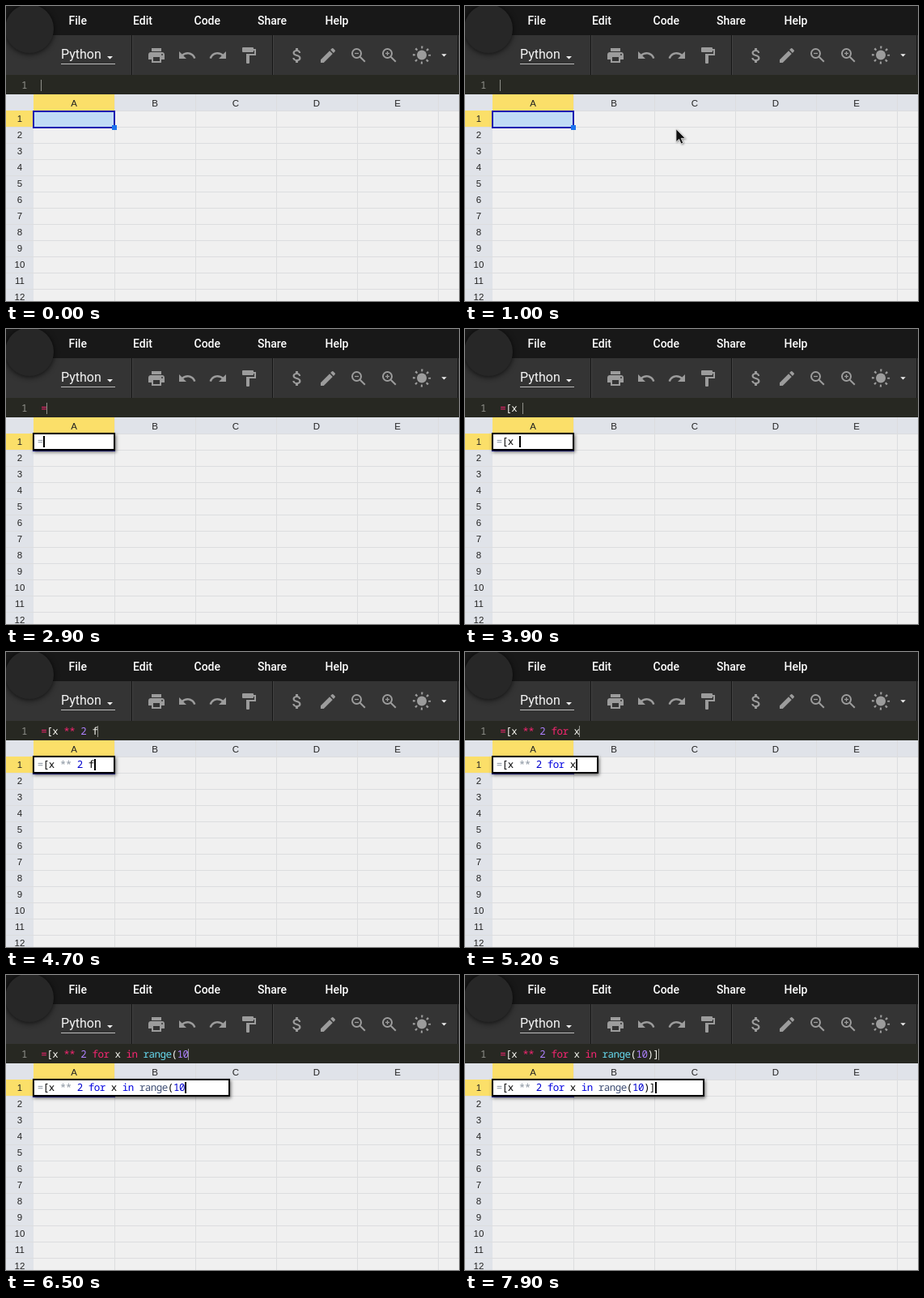
An HTML page that plays this animation: 560x364 px, repeating every 8000 ms.

```html
<!DOCTYPE html>
<html lang="en">
<head>
<meta charset="utf-8">
<title>Spreadsheet formula</title>
<style>
html, body { margin: 0; width: 100%; height: 100%; overflow: hidden; }
body { position: relative; background: #f0f0f0; }
div, svg, .caret { position: absolute; }

.menu { left: 0; top: 0; width: 560px; height: 36px; background: #181818; font: 500 14px/36px Roboto, sans-serif; color: #fff; }
.menu span { position: absolute; }
.tools { left: 0; top: 36px; width: 560px; height: 49px; background: #343434; }
.lang { left: 68px; top: 51px; width: 67px; height: 20px; border-bottom: 1px solid #bbb; font: 16px/18px Roboto, sans-serif; color: #f4f4f4; }
.logo { left: -1px; top: -2px; width: 60px; height: 60px; border-radius: 50%; background: #272727; box-shadow: 0 1px 7px #000b; }
.icons { left: 0; top: 0; fill: #9c9c9c; }
.line { fill: none; stroke: #9c9c9c; stroke-width: 2; }

.mono { font: 500 12.5px/20px "Noto Sans Mono", monospace; letter-spacing: -.5px; white-space: pre; text-rendering: geometricPrecision; }
.bar { left: 0; top: 85px; width: 560px; height: 24px; background: #272822; color: #f8f8f2; }
.bar div { top: 3px; }
.num { left: 19px; color: #8f908a; }
#barText { left: 43.3px; }
#barCaret { top: 6px; width: 1px; height: 14px; background: #8f908a; }

.grid { left: 0; top: 109px; width: 560px; height: 255px; }
.cols { left: 0; top: 0; width: 560px; height: 20px; background: #e0e3e9; }
.rows { left: 0; top: 20px; width: 34px; height: 235px; background: #e0e3e9; }
.lines { inset: 0; background:
  repeating-linear-gradient(90deg, transparent 0 99px, #dcdddf 99px 100px) 35px 0 / 525px 100% no-repeat,
  repeating-linear-gradient(transparent 0 19px, #dcdddf 19px 20px) 0 1px / 100% 100% no-repeat; }
.head { font: 11.5px/20px "Liberation Sans", Arial, sans-serif; color: #222; text-align: center; height: 20px; }
.head.col { line-height: 22px; }
.on { background: #fbdf69; }

#sel { left: 33px; top: 129px; width: 98px; height: 18px; border: 2px solid #1515b0; background: #c0dcf6; }
#knob { left: 131px; top: 147px; width: 6px; height: 6px; background: #1c74ee; }
#edit { left: 33px; top: 128px; height: 22px; box-sizing: border-box; border: 2px solid #000; background: #fff; box-shadow: 1px 2px 4px #0009; }
#cellText { left: 38.7px; top: 129px; color: #000; }
#cellCaret { top: 132px; width: 2px; height: 14px; background: #000; }
#mouse { left: 0; top: 0; overflow: visible; filter: drop-shadow(1px 1px 1px #0006); }

#barText .op, #barText .key { color: #f92672; }
#barText .lit { color: #ae81ff; }
#barText .fn { color: #66d9ef; }
#cellText .op { color: #8a94a0; }
#cellText .key { color: #0000e0; }
#cellText .lit { color: #0000cd; }
#cellText .fn { color: #3c4c72; }
</style>
</head>
<body>
<div class="menu">
  <span style="left:77.6px">File</span><span style="left:157px">Edit</span><span style="left:232.5px">Code</span><span style="left:311px">Share</span><span style="left:394.5px">Help</span>
</div>
<div class="tools"></div>
<div class="lang">Python</div>

<svg class="icons" width="560" height="85">
  <path d="M155.5 36V85M329.5 36V85M558.5 36V85" stroke="#161616"/>
  <path d="M156.5 36V85M330.5 36V85" stroke="#424242"/>
  <path d="M125 62h7l-3.5 3.5zM538.3 59.3h6.4l-3.2 3.3z" fill="#eee"/>
  <path transform="translate(174 49)" d="M19 8H5c-1.7 0-3 1.3-3 3v6h4v4h12v-4h4v-6c0-1.7-1.3-3-3-3zm-3 11H8v-5h8zm3-7a1 1 0 1 1 0-2 1 1 0 0 1 0 2zM18 3H6v4h12z"/>
  <path id="undo" transform="translate(212 49)" d="M12.5 8c-2.65 0-5.05 1-6.9 2.6L2 7v9h9l-3.6-3.6c1.4-1.2 3.1-1.9 5.1-1.9 3.5 0 6.5 2.3 7.6 5.5l2.4-.8C21.1 11 17.2 8 12.5 8z"/>
  <use href="#undo" transform="translate(486 0) scale(-1 1)"/>
  <path transform="translate(288 49)" d="M18 4V3a1 1 0 0 0-1-1H5a1 1 0 0 0-1 1v4a1 1 0 0 0 1 1h12a1 1 0 0 0 1-1V6h1v4H9v11a1 1 0 0 0 1 1h2a1 1 0 0 0 1-1v-9h8V4z"/>
  <path transform="translate(348 49)" d="M11.8 10.9c-2.3-.6-3-1.2-3-2.15 0-1.1 1-1.85 2.7-1.85 1.8 0 2.4.85 2.5 2.1h2.2c-.1-1.7-1.1-3.3-3.2-3.8V3h-3v2.2C8 5.6 6.5 6.8 6.5 8.8c0 2.3 1.9 3.4 4.7 4.1 2.5.6 3 1.5 3 2.4 0 .7-.5 1.8-2.7 1.8-2.1 0-2.9-.9-3-2.1H6.3c.1 2.2 1.8 3.4 3.7 3.8V21h3v-2.1c2-.4 3.5-1.5 3.5-3.6 0-2.8-2.4-3.8-4.7-4.4z"/>
  <path transform="translate(386 49)" d="M3 17.25V21h3.75L17.8 9.95 14.05 6.2zM20.7 7a1 1 0 0 0 0-1.4l-2.3-2.3a1 1 0 0 0-1.4 0l-1.9 1.8 3.8 3.8z"/>
  <g class="line">
    <g id="lens"><circle cx="433.5" cy="58.5" r="5.5"/><path d="M437.7 62.7l6.1 6.1"/><path d="M431 58.5h5" stroke-width="1.3"/></g>
    <use href="#lens" x="38"/>
    <path d="M471.5 56v5" stroke-width="1.3"/>
    <circle cx="514" cy="60.5" r="9.6" stroke-width="3" stroke-dasharray="2.2 5.34" stroke-dashoffset="1.1"/>
  </g>
  <circle cx="514" cy="60.5" r="6"/>
</svg>
<div class="logo"></div>

<div class="bar mono">
  <div class="num">1</div>
  <div id="barText"></div>
  <span class="caret" id="barCaret"></span>
</div>

<div class="grid"><div class="cols"></div><div class="rows"></div><div class="lines"></div></div>
<div id="sel"></div>
<div id="knob"></div>
<div id="edit"></div>
<div id="cellText" class="mono"></div>
<span class="caret" id="cellCaret"></span>
<svg id="mouse" width="14" height="22"><path d="M0 0V16L3.7 12.6L6.2 18.4L8.8 17.3L6.3 11.6H11.4Z" fill="#111" stroke="#eee" stroke-width=".8"/></svg>

<script>
const LOOP = 8000, STEP = 100, CHAR = 7;
const $ = id => document.getElementById(id);

const tokens = [
  ['=', 'op'], ['[x '], ['**', 'op'], [' '], ['2', 'lit'], [' '], ['for', 'key'], [' x '],
  ['in', 'key'], [' '], ['range', 'fn'], ['('], ['10', 'lit'], [')]']
];
// Time of each key press, in units of 100 ms.
const keys = [29, 36, 38, 39, 41, 42, 44, 45, 46, 47, 48, 49, 50, 52, 53, 54, 54, 55, 56, 56, 57, 59, 60, 62, 63, 65, 68, 70];

function addHead(text, kind, x, y, width, on) {
  const el = document.createElement('div');
  el.className = `head ${kind} ${on ? 'on' : ''}`;
  el.textContent = text;
  el.style.cssText = `left:${x}px;top:${y}px;width:${width}px`;
  document.querySelector('.grid').append(el);
}
[...'ABCDE'].forEach((c, i) => addHead(c, 'col', 34 + 100 * i, 0, 100, !i));
for (let r = 0; r < 12; r++) addHead(r + 1, 'row', 0, 20 + 20 * r, 34, !r);

// Words take their colour once complete; operators and numbers at once.
function colored(n) {
  let html = '';
  for (const [text, kind] of tokens) {
    if (n <= 0) break;
    const part = text.slice(0, n);
    const plain = !kind || (part !== text && (kind === 'key' || kind === 'fn'));
    html += plain ? part : `<span class="${kind}">${part}</span>`;
    n -= text.length;
  }
  return html;
}

function mouseAt(t) {
  if (t < 700 || t >= 2900) return null;
  if (t < 2500) {
    const p = Math.min(1, (t - 700) / 800), rest = (1 - p) ** 2;
    return [91 + 435 * rest, 140 + 30 * rest];
  }
  const p = Math.min(1, (t - 2400) / 400);
  return [91 + 94 * p, 140 + 104 * p];
}

const show = (id, on) => $(id).style.visibility = on ? 'visible' : 'hidden';
let shown = -1;

function draw(t) {
  const n = keys.filter(k => k * 100 <= t).length;
  const off = (t >= 3400 && t < 3600) || (t >= 7500 && t < 7900);
  if (n !== shown) {
    $('barText').innerHTML = $('cellText').innerHTML = colored(n);
    shown = n;
  }
  $('barCaret').style.left = 43 + CHAR * n + 'px';
  $('cellCaret').style.left = 39 + CHAR * n + 'px';
  $('edit').style.width = Math.max(102, Math.round(9.4 * n)) + 'px';
  show('edit', n);
  show('knob', !n);
  show('cellCaret', n && !off);
  const pos = mouseAt(t);
  show('mouse', pos);
  if (pos) $('mouse').style.transform = `translate(${pos[0]}px, ${pos[1]}px)`;
}

const start = performance.now();
function tick() {
  const t = (performance.now() - start) % LOOP;
  draw(Math.floor(t / STEP) * STEP);
  requestAnimationFrame(tick);
}
tick();
</script>
</body>
</html>
```
